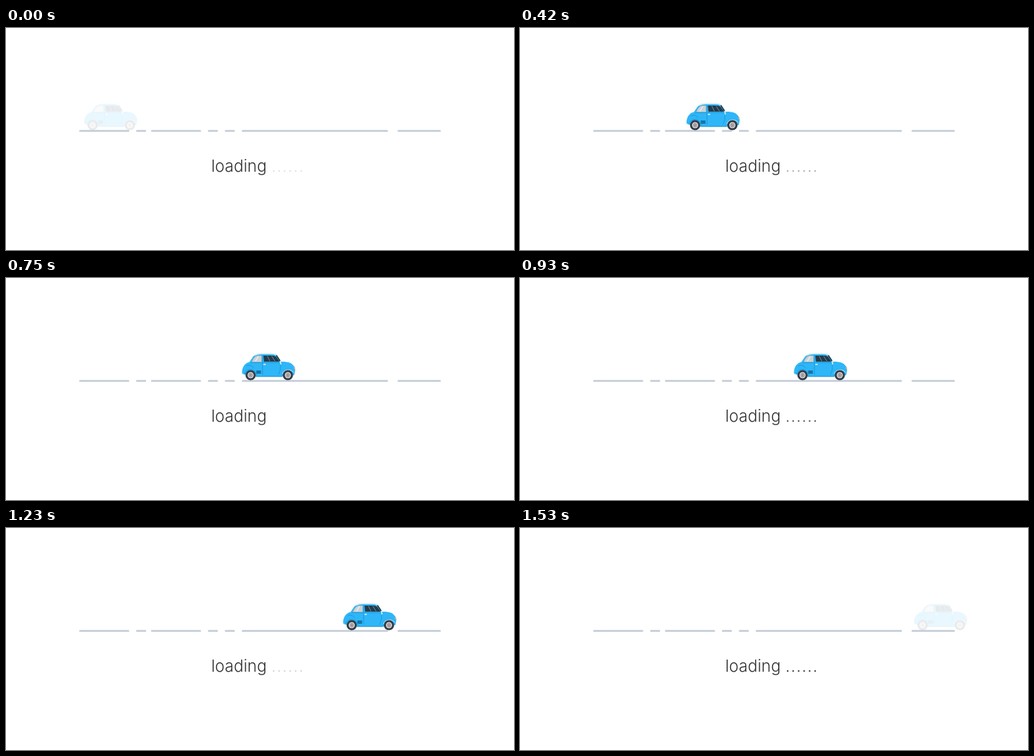
An HTML page for the animation above (1.56 s loop, 750 by 329 pixels).

```html
<!DOCTYPE html>
<html lang="en">
<head>
<meta charset="utf-8">
<title>Loading</title>
<style>
  html, body { margin: 0; height: 100%; overflow: hidden; background: #fff; }
  svg { display: block; }
  text { font: 300 24px Inter, "Open Sans", sans-serif; fill: #333; }
</style>
</head>
<body>
<svg width="750" height="329" viewBox="0 0 750 329">
  <defs>
    <g id="wheel">
      <circle r="7.6" fill="#343e48"/>
      <circle r="4.5" fill="#e2dedf"/>
      <circle r="2.9" fill="#77737b"/>
      <circle r="2.1" fill="#d9cfd0"/>
      <circle r=".9" fill="#5b5058"/>
    </g>
  </defs>
  <path d="M109.5 152.5H180.5M193.5 152.5H205.5M215.5 152.5H286.5M299.5 152.5H311.5M324.5 152.5H336.5M349.5 152.5H562.5M579.5 152.5H640.5"
        stroke="#c9d1dd" stroke-width="3" stroke-linecap="round"/>
  <g id="car" fill="none" stroke-linecap="round" stroke-linejoin="round">
    <path fill="#2fb6f8" d="M1 30C1 21 5 15 12 13.5L17 6Q20 2 27 1.5H45Q51 2 53 6L58.5 13C67 12.5 75 14.5 77 19Q80 21 79.5 26L78 33 60 35H20L3 32Z"/>
    <path stroke="#dceff4" stroke-width="1.8" d="M20 3.2Q24 1 30 1H43Q49 1 51.5 2.6"/>
    <path fill="#c9d3d8" stroke="#8fa5b0" stroke-width=".7" d="M15.5 13.5Q18 5 24 4H30V13.5Z"/>
    <path stroke="#eef2f3" stroke-width="1.3" d="M21 12 25 5.5"/>
    <path fill="#243b4c" d="M32.5 4H46.5Q50 4.5 51.5 6L56.5 13H33.5Z"/>
    <path stroke="#8399a5" stroke-width=".9" d="M38.5 5 42 12M45 5 49.5 12"/>
    <path stroke="#20313f" stroke-width="1.6" d="M52 4 57 11.5"/>
    <path stroke="#f4f1e4" stroke-width="1.5" d="M57.5 12.5 58.3 16.5"/>
    <path stroke="#1593d3" stroke-width=".8" d="M31.3 4V32M57.8 18Q59 25 55 32M14 14.5H30M33 14.5H56M8 19Q14 16 18 22"/>
    <path stroke="#eef8fb" stroke-width="1.3" d="M33 17H35.5"/>
    <path fill="#1676a8" d="M22 26h7v5h-7z"/>
    <path stroke="#1593d3" stroke-width=".8" d="M5 31C6 22 21 22 23 33M60 32C61 22 76 22 78 30"/>
    <path stroke="#d9edf4" stroke-width="1" d="M60.5 31C62 23.5 74 23 77.5 29M3 31.5 5 33"/>
    <path stroke="#e8b48b" stroke-width="1.6" d="M78.3 21.5 79 24"/>
    <path stroke="#1689c4" stroke-width="1" d="M22 35H60"/>
    <use href="#wheel" x="13.7" y="33"/>
    <use href="#wheel" x="68.7" y="33"/>
  </g>
  <text x="303" y="213">loading</text>
  <path id="dots" d="M395.2 210.8v2.2m8.1-2.2v2.2m8.1-2.2v2.2m8.1-2.2v2.2m8.1-2.2v2.2m8.1-2.2v2.2" stroke="#333" stroke-width="2"/>
</svg>
<script>
const LOOP = 1560, STEP = 30, FADE = 240;
const car = document.getElementById('car');
const dots = document.getElementById('dots');

// [time, opacity] of the blinking dots
const blink = [[0, .15], [330, .78], [520, 0], [750, 0], [960, 1], [1300, 0], [1530, 1]];

function valueAt(keys, t) {
  const i = Math.max(1, keys.findIndex(key => key[0] >= t));
  const [t0, a] = keys[i - 1], [t1, b] = keys[i];
  return a + (b - a) * (t - t0) / (t1 - t0);
}

function draw(now) {
  const t = Math.floor(now % LOOP / STEP) * STEP;
  const x = 114.2 + .311 * Math.min(t, 1500);
  car.setAttribute('transform', `translate(${x} 111)`);
  car.setAttribute('opacity', Math.min(1, .1 + .9 * Math.min(t, LOOP - STEP - t) / FADE));
  dots.setAttribute('opacity', valueAt(blink, t));
}

const start = performance.now();
function tick() {
  draw(performance.now() - start);
  requestAnimationFrame(tick);
}
tick();
</script>
</body>
</html>
```
